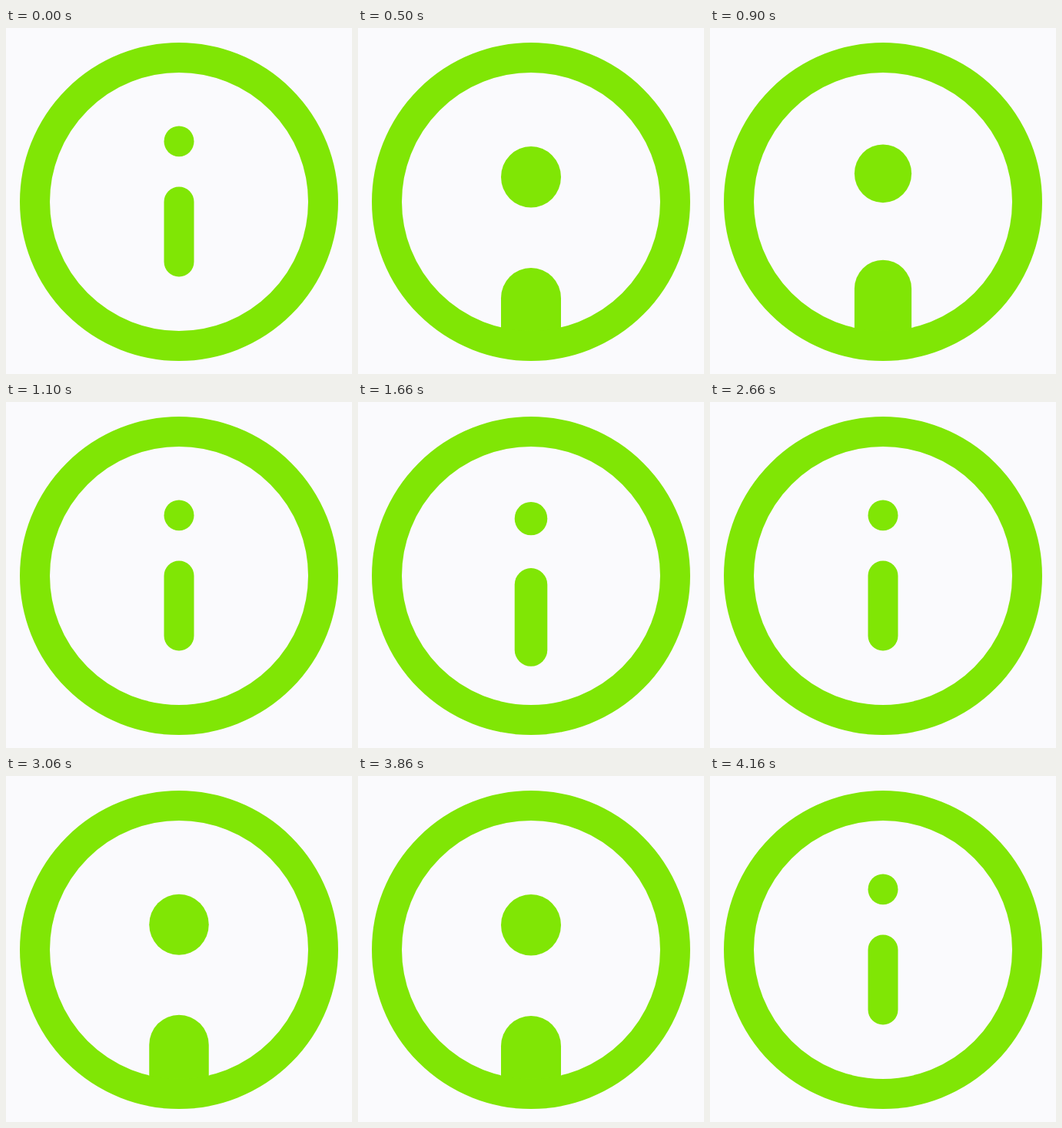
These frames come from a looping animation (450x450 px, 4.66 s). An HTML page:

```html
<!DOCTYPE html>
<html lang="en">
<head>
<meta charset="utf-8">
<title>Info icon</title>
<style>
  html, body { margin: 0; width: 100%; height: 100%; overflow: hidden; background: #fafafd; }
  svg { display: block; width: 100%; height: 100%; }
</style>
</head>
<body>
<svg viewBox="0 0 450 450" fill="#80e605">
  <clipPath id="disc"><circle cx="225" cy="226" r="206"/></clipPath>
  <g clip-path="url(#disc)">
    <g id="letter">
      <ellipse cx="225" cy="147.4" rx="19.5" ry="19.9"/>
      <rect x="205.5" y="206.5" width="39" height="117" rx="19.5" ry="19.6"/>
    </g>
  </g>
  <circle cx="225" cy="226" r="187.5" fill="none" stroke="#80e605" stroke-width="39"/>
</svg>
<script>
  const LOOP = 4660;
  const PIVOT_Y = 101;
  // Each cycle: grow start, grow end, shrink start, shrink end (ms)
  const CYCLES = [
    [10, 500, 820, 1100],
    [1515, 2030, 2155, 2430],
    [2655, 3130, 3865, 4160]
  ];
  const letter = document.getElementById("letter");

  const ease = p => p < 0.5 ? 4 * p ** 3 : 1 - 4 * (1 - p) ** 3;
  const ramp = (t, from, to) =>
    ease(Math.min(1, Math.max(0, (t - from) / (to - from))));

  function draw(t) {
    let grown = 0;
    for (const [a, b, c, d] of CYCLES) grown += ramp(t, a, b) - ramp(t, c, d);
    letter.setAttribute("transform",
      `translate(225 ${PIVOT_Y}) scale(${1 + grown}) translate(-225 ${-PIVOT_Y})`);
  }

  const start = performance.now();
  function tick() {
    draw((performance.now() - start) % LOOP);
    requestAnimationFrame(tick);
  }
  tick();
</script>
</body>
</html>
```
